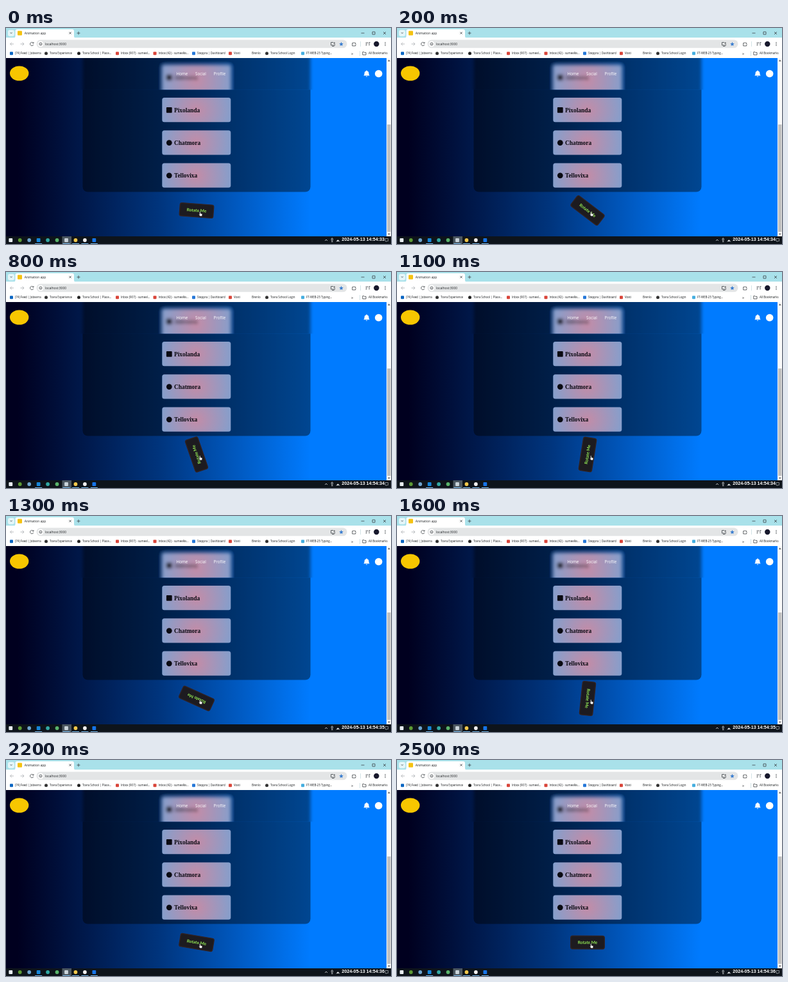
These frames come from a looping animation (600 by 338 pixels, 2.6 s). An HTML page:

```html
<!DOCTYPE html>
<html lang="en">
<head>
<meta charset="utf-8">
<title>Animation app</title>
<style>
  html, body { margin: 0; width: 100%; height: 100%; overflow: hidden; background: #00001f; }
  svg { display: block; width: 100vw; height: 100vh; }
  text { font-family: "Open Sans", "Noto Sans", sans-serif; white-space: pre; }
  .ui { font-size: 4.9px; fill: #1e2123; }
  .marks { font-size: 4.45px; fill: #16191b; }
  .card { font: bold 9.4px "Liberation Serif", serif; fill: #0a0a12; }
  .nav { font: 6.3px Lato, sans-serif; fill: #fff; }
  .spin { font: bold 6.6px Lato, sans-serif; fill: #94ec55; text-anchor: middle; }
  .clock { font: bold 7.1px "Liberation Sans", sans-serif; fill: #fff; }
  .line { fill: none; stroke: #3b4144; stroke-width: .8; }
</style>
</head>
<body>
<svg viewBox="0 0 600 338" preserveAspectRatio="none">
  <defs>
    <linearGradient id="sky">
      <stop offset=".03" stop-color="#00001f"/>
      <stop offset=".4" stop-color="#00347c"/>
      <stop offset=".8" stop-color="#007bff"/>
    </linearGradient>
    <radialGradient id="glow" cx="0" cy="0" r="1" gradientTransform="translate(.5 .5) scale(.53 1.48)">
      <stop offset="0" stop-color="#c38ca7"/>
      <stop offset="1" stop-color="#839fcd"/>
    </radialGradient>
    <filter id="soft" x="-10%" y="-30%" width="120%" height="160%"><feGaussianBlur stdDeviation="2.6"/></filter>
    <clipPath id="head"><rect y="47" width="593" height="49.5"/></clipPath>
    <clipPath id="body"><rect y="96.5" width="593" height="229.5"/></clipPath>
  </defs>

  <!-- page -->
  <rect y="47" width="593" height="279" fill="url(#sky)"/>
  <g clip-path="url(#body)">
    <rect x="119.5" y="20" width="355" height="236.5" rx="8" fill="#000" opacity=".43"/>
    <g id="cards"></g>
  </g>
  <g clip-path="url(#head)">
    <g filter="url(#soft)">
      <rect x="119.5" y="20" width="355" height="110" fill="#000" opacity=".43"/>
      <g id="hidden"></g>
    </g>
  </g>

  <!-- page header -->
  <ellipse cx="20.7" cy="71" rx="14.7" ry="11.5" fill="#f7c600"/>
  <g class="nav">
    <text x="265.5" y="74.3">Home</text>
    <text x="295" y="74.3">Social</text>
    <text x="323.5" y="74.3">Profile</text>
  </g>
  <path d="M557.3 74.6q1.3-1.3 1.3-3.6 0-3.2 2.7-3.7v-.8h1.4v.8q2.7.5 2.7 3.7 0 2.3 1.3 3.6zM560.6 75.4h2.8q-1.4 2-2.8 0z" fill="#fff"/>
  <circle cx="580.7" cy="71.5" r="5.8" fill="#fff"/>

  <!-- turning button and pointer -->
  <g id="button">
    <rect x="-26.3" y="-10.2" width="52.6" height="20.4" rx="3" fill="#1d1b20" stroke="#33211f" stroke-width="1.3"/>
    <text class="spin" y="2.2">Rotate Me</text>
  </g>
  <path d="M301.6 287.6q.8-.7 1.4.2v2.3l2.3.7q.8.3.6 1.3l-.5 2.5h-3l-1.9-2.8q.3-.9 1.1-.1z" fill="#fff" stroke="#111" stroke-width=".5"/>

  <!-- scrollbar -->
  <rect x="593" y="47" width="7" height="279" fill="#fafafa"/>
  <rect x="594" y="151" width="5.5" height="168" fill="#c1c1c1"/>
  <path d="M594.8 52.2l2-2.6 2 2.6zM594.8 321.5l2 2.6 2-2.6z" fill="#666"/>

  <!-- browser frame -->
  <rect width="600" height="16" fill="#a9e1ea"/>
  <rect y="15" width="600" height="32" fill="#fff"/>
  <path d="M12 15.2q2.5 0 2.5-2.5V5q0-3 3-3h85.500q3 0 3 3v7.700q0 2.500 2.500 2.500z" fill="#fff"/>
  <rect x="3" y="3" width="10" height="10" rx="3" fill="#e4f5f8"/>
  <rect x="18" y="4.5" width="7" height="7" rx="1" fill="#f5c211"/>
  <text class="ui" x="28.7" y="9.7">Animation app</text>
  <rect x="47.5" y="18.5" width="484" height="12.8" rx="6.4" fill="#e3e5e6"/>
  <circle cx="54" cy="25" r="4.5" fill="#fff"/>
  <text class="ui" x="61" y="26.8">localhost:3000</text>
  <g class="line">
    <path d="M6.6 7l1.5 1.5L9.6 7M98.5 6.3l3.2 3.2m0-3.2l-3.2 3.2M110.500 8h5m-2.500-2.500v5"/>
    <path d="M553.5 8h5M571 6h4v4h-4zM588 6l4 4m0-4l-4 4"/>
    <path d="M42.6 23.6a2.7 2.7 0 1 0 .2 2.500m.2-4v1.800h-1.800"/>
    <path d="M12 25H6.5m2.5-2.500L6.500 25 9 27.500M22.500 25h5.500m-2.500-2.500l2.500 2.500-2.500 2.500" stroke="#a9adb0"/>
    <circle cx="54" cy="25" r="2.1"/><path d="M54 24.7v1.3"/>
    <path d="M512.5 25.5v1.500h-6v-4.500h3.500M508 28.500h3.500M511.700 22v2.500m-1.200-1.200l1.200 1.200 1.200-1.200"/>
    <path d="M539.7 23.5h1.800q.8-2 1.600 0h1.600v1.600q1.500.7 0 1.500v1.400h-5z"/>
    <path d="M560.5 23h4m-4 2h2.500m-2.500 2h2M566 27.500v-5h1.500"/>
    <path d="M552.5 21v8M551.5 36v8" stroke="#c7dce0"/>
    <path d="M555.8 37.5h2l.7.8h2.500v3.700h-5.200z"/>
  </g>
  <path d="M522.5 21.8l1 2.1 2.3.3-1.7 1.600.4 2.300-2-1.100-2 1.100.4-2.300-1.700-1.600 2.300-.3z" fill="#3d7fd0"/>
  <circle cx="577.3" cy="25" r="4.2" fill="#17182c"/>
  <g fill="#3b4144"><circle cx="591" cy="22.7" r=".7"/><circle cx="591" cy="25" r=".7"/><circle cx="591" cy="27.3" r=".7"/></g>
  <g id="marks" class="marks"></g>

  <!-- taskbar -->
  <rect y="326" width="600" height="12" fill="#0e141b"/>
  <rect x="87.5" y="326" width="14.5" height="12" fill="#4b5660"/>
  <g id="tasks"></g>
  <g fill="none" stroke="#dfe3e6" stroke-width=".8">
    <path d="M497 333l2-2 2 2M507 334.5h2.5M514.800 334.500q2.500-5 5 0"/>
    <rect x="507.2" y="328.8" width="2" height="4.2" rx="1"/>
    <path d="M591 329.5h4.500v4h-2l-1 1v-1H591z" stroke="#9ba1a6"/>
  </g>
  <circle cx="517.3" cy="333" r="1.3" fill="#dfe3e6"/>
  <text id="clock" class="clock" x="523.3" y="333.2"></text>
</svg>
<script>
const el = id => document.getElementById(id);
const dot = (x, y, r, fill) => `<circle cx="${x}" cy="${y}" r="${r}" fill="${fill}"/>`;
const box = (x, y, r, fill) => `<rect x="${x - r}" y="${y - r}" width="${2 * r}" height="${2 * r}" rx="1" fill="${fill}"/>`;

const card = (y, name, mark, height = 38.3) =>
  `<rect x="243.3" y="${y}" width="107" height="${height}" rx="3.5" fill="url(#glow)"/>` +
  mark(254.3, y + 19.3, 4.4, "#0a0a12") +
  `<text class="card" x="262" y="${y + 22.5}">${name}</text>`;

el("hidden").innerHTML = card(58, "Jobverra", box, 46);
el("cards").innerHTML = card(109, "Pixolanda", box) + card(160.3, "Chatmora", dot) + card(211.5, "Tellovixa", dot);

const bookmarks = [
  [14, "(74) Feed | Jobverra", "#0a66c2", box],
  [68, "Tovra Experience", "#333", dot],
  [119, "Tovra School | Place...", "#222", dot],
  [179, "Inbox (907) - sumeel...", "#d9453a", box],
  [237.5, "Inbox (42) - sumeelkv...", "#d9453a", box],
  [298, "Steppra | Dashboard", "#2678d9", box],
  [355, "Vosti", "#d9453a", box],
  [383, "Brenlo", "#fff", dot],
  [412, "Tovra School Login", "#333", dot],
  [468, "FT-WEB-25 Typing...", "#45aee0", box],
];
el("marks").innerHTML = bookmarks.map(([x, name, fill, mark]) =>
  mark(x - 5.5, 39.8, 2.5, fill) + `<text x="${x}" y="41.3">${name}</text>`).join("") +
  `<text x="538" y="41.5" font-size="6">»</text><text x="565" y="41.3">All Bookmarks</text>`;

const apps = ["#e8edf1", "#5d9a35", "#6fa5cf", "#1686d9", "#32a9a4", "#59b46b", "#c9d3da", "#f2c84b", "#f1eeee", "#1673e8"];
el("tasks").innerHTML = apps.map((fill, i) => {
  const x = 7.3 + i * 14.45;
  const open = [3, 6, 7, 8, 9].includes(i);
  return (i % 3 ? dot : box)(x, 332, 2.9, fill) +
    (open ? `<rect x="${x - 5.5}" y="337" width="11" height="1" fill="#76b9ed"/>` : "");
}).join("");

// Cubic easing curve, solved by bisection.
const curve = (x1, y1, x2, y2) => x => {
  if (x >= 1) return 1;
  const at = (a, b, s) => 3 * a * s * (1 - s) ** 2 + 3 * b * s * s * (1 - s) + s ** 3;
  let lo = 0, hi = 1;
  for (let i = 0; i < 24; i++) {
    const mid = (lo + hi) / 2;
    if (at(x1, x2, mid) < x) lo = mid; else hi = mid;
  }
  return at(y1, y2, lo);
};
const easeInOut = curve(.36, 0, .6, 1), ease = curve(.25, .1, .25, 1);

// The turn to 360 degrees is let go before its end and eases back to zero.
const release = 960;
const forward = t => 360 * easeInOut((t + 100) / 1470);
const angle = t => t < release ? forward(t) : forward(release) * (1 - ease((t - release) / 1600));

function draw(now) {
  const t = Math.floor((now % 2600) / 100) * 100;
  el("button").setAttribute("transform", `translate(297 285.5) rotate(${angle(t)})`);
  el("clock").textContent = "2024-05-13 14:54:" + (33 + Math.floor((t + 800) / 1000));
  requestAnimationFrame(draw);
}
draw(performance.now());
</script>
</body>
</html>
```
